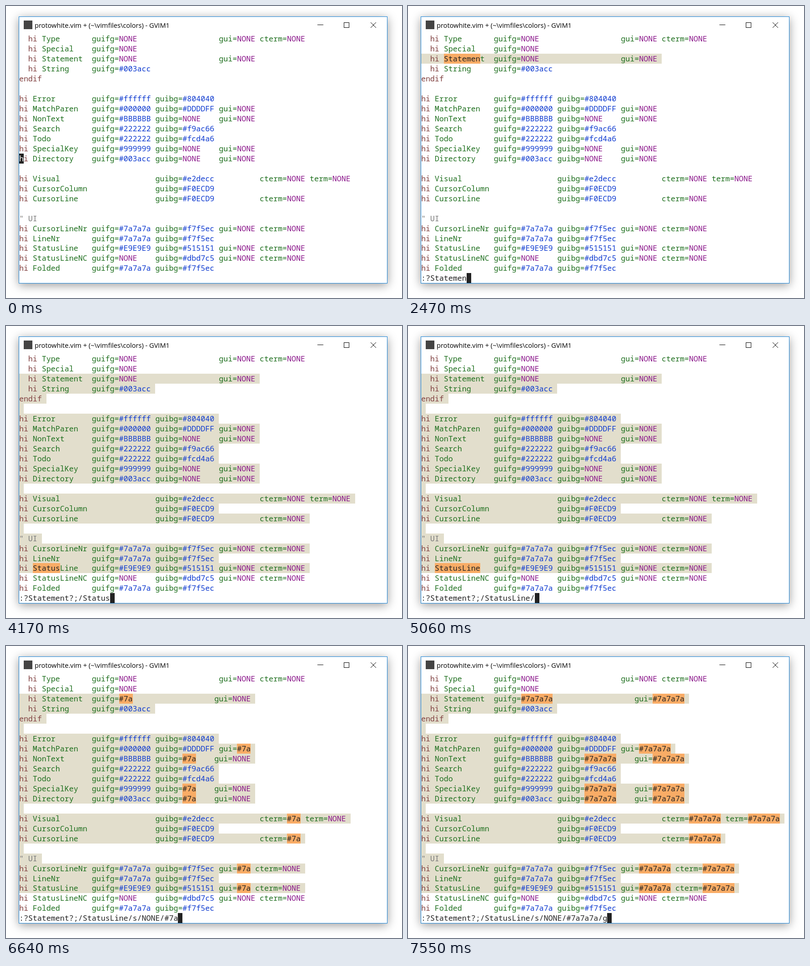
Recreate the animation shown at these times as an HTML page with a canvas. Size 871 by 643 pixels, loop 9330 ms.

```html
<!DOCTYPE html>
<html lang="en">
<head>
<meta charset="utf-8">
<title>Substitute preview</title>
<style>
  html, body { margin: 0; width: 100%; height: 100%; overflow: hidden; background: #fff; }
  canvas { display: block; }
</style>
</head>
<body>
<canvas id="stage" width="871" height="643"></canvas>
<script>
const ctx = document.getElementById('stage').getContext('2d');
const LOOP = 9330, COMMAND_OPENS = 230;
const LEFT = 28.9, TOP = 61.1, CELL = 9.985, ROW = 21.97;
const CURSOR_LINE = 12, COMMAND_ROW = 24;
const COMMAND = ':?Statement?;/StatusLine/s/NONE/#7a7a7a/g';
const COLOR = {
  text: '#222222', keyword: '#804040', group: '#1e6f1e', value: '#8a168a',
  hex: '#0f3bd0', comment: '#7a7a7a', range: '#e2decc', match: '#f9ac66', border: '#1883d7'
};

// Fields are separated by | and padded to fixed columns.
const WIDTHS = [16, 14, 14, 9, 11, 9];
const LINES = `  hi Type|guifg=NONE||gui=NONE|cterm=NONE
  hi Special|guifg=NONE
  hi Statement|guifg=NONE||gui=NONE
  hi String|guifg=#003acc
endif

hi Error|guifg=#ffffff|guibg=#804040
hi MatchParen|guifg=#000000|guibg=#DDDDFF|gui=NONE
hi NonText|guifg=#BBBBBB|guibg=NONE|gui=NONE
hi Search|guifg=#222222|guibg=#f9ac66
hi Todo|guifg=#222222|guibg=#fcd4a6
hi SpecialKey|guifg=#999999|guibg=NONE|gui=NONE
hi Directory|guifg=#003acc|guibg=NONE|gui=NONE

hi Visual||guibg=#e2decc||cterm=NONE|term=NONE
hi CursorColumn||guibg=#F0ECD9
hi CursorLine||guibg=#F0ECD9||cterm=NONE

" UI
hi CursorLineNr|guifg=#7a7a7a|guibg=#f7f5ec|gui=NONE|cterm=NONE
hi LineNr|guifg=#7a7a7a|guibg=#f7f5ec
hi StatusLine|guifg=#E9E9E9|guibg=#515151|gui=NONE|cterm=NONE
hi StatusLineNC|guifg=NONE|guibg=#dbd7c5|gui=NONE|cterm=NONE
hi Folded|guifg=#7a7a7a|guibg=#f7f5ec`.split('\n').map(line =>
  line.split('|').map((field, i) => field.padEnd(WIDTHS[i])).join('').trimEnd());

// [key index, time] pairs; keys between them are evenly spaced.
const RHYTHM = [[0, 1050], [1, 1280], [2, 1450], [14, 3490], [15, 3640], [16, 3830],
  [18, 4170], [19, 4340], [20, 4490], [25, 5390], [26, 5560], [28, 5880], [29, 5990],
  [30, 6190], [32, 6510], [33, 6620], [34, 6770], [39, 7550]];
const SLOW_KEYS = [15, 20, 21, 22, 29, 33, 34, 35, 36, 37];
const KEY_TIMES = Array.from({ length: COMMAND.length - 1 }, (_, key) => {
  const i = Math.max(1, RHYTHM.findIndex(([k]) => k >= key));
  const [k0, t0] = RHYTHM[i - 1], [k1, t1] = RHYTHM[i];
  return t0 + (t1 - t0) * (key - k0) / (k1 - k0);
});
const PREVIEW_TIMES = KEY_TIMES.map((time, key) => time + (SLOW_KEYS.includes(key) ? 20 : 0));

function typedAt(times, t) {
  if (t < COMMAND_OPENS) return '';
  return COMMAND.slice(0, 1 + times.filter(time => time <= t).length);
}

function findMatches(text, pattern) {
  const marks = [];
  for (let at = text.indexOf(pattern); at >= 0; at = text.indexOf(pattern, at + pattern.length))
    marks.push([at, pattern.length]);
  return marks;
}

function substitute(text, pattern, replacement, everywhere) {
  const marks = [];
  let from = 0;
  do {
    const at = text.indexOf(pattern, from);
    if (at < 0) break;
    text = text.slice(0, at) + replacement + text.slice(at + pattern.length);
    marks.push([at, replacement.length]);
    from = at + replacement.length;
  } while (everywhere);
  return { text, marks };
}

function preview(command) {
  const rows = LINES.map(text => ({ text, marks: [], selected: false }));
  const [, back, forward, , pattern, replacement, flag] = command.split(/[?;/]+/);
  if (!back) return rows;
  const first = LINES.slice(0, CURSOR_LINE).findLastIndex(line => line.includes(back));
  const last = forward ? LINES.findIndex((line, i) => i > first && line.includes(forward)) : first;
  for (let i = first; i <= last; i++) {
    const row = rows[i];
    row.selected = true;
    if (replacement) Object.assign(row, substitute(row.text, pattern, replacement, flag === 'g'));
    else if (pattern) row.marks = findMatches(row.text, pattern);
  }
  const searching = !pattern && (forward || !command.endsWith('/'));
  if (searching) rows[last].marks = findMatches(rows[last].text, forward || back).slice(0, 1);
  return rows;
}

function tokenColor(token) {
  if (token[0] === '"') return COLOR.comment;
  if (token[0] === '#') return COLOR.hex;
  if (token === 'NONE') return COLOR.value;
  return token === 'hi' || token === 'endif' ? COLOR.keyword : COLOR.group;
}

const columnX = col => Math.round(LEFT + col * CELL);
const rowY = row => Math.round(TOP + row * ROW);

function fillCells(row, col, count, color) {
  const x = columnX(col), y = rowY(row);
  ctx.fillStyle = color;
  ctx.fillRect(x, y, columnX(col + count) - x, Math.min(rowY(row + 1), 610) - y);
}

function drawText(row, col, text, color) {
  ctx.fillStyle = color;
  [...text].forEach((char, i) => ctx.fillText(char, LEFT + (col + i) * CELL, rowY(row) + 17));
}

function drawRow({ text, marks, selected }, row) {
  if (selected) fillCells(row, 0, text.length + 1, COLOR.range);
  const colors = [];
  for (const match of text.matchAll(/".*|#\w*|NONE|\w+=?/g))
    colors.fill(0, 0, 0), [...match[0]].forEach((_, i) => { colors[match.index + i] = tokenColor(match[0]); });
  for (const [start, length] of marks) {
    fillCells(row, start, length, COLOR.match);
    for (let i = start; i < start + length; i++) colors[i] = COLOR.text;
  }
  [...text].forEach((char, i) => { if (char !== ' ') drawText(row, i, char, colors[i]); });
}

function drawCursor(row, col, char = '') {
  fillCells(row, col, 1, COLOR.text);
  drawText(row, col, char, '#fff');
}

function strokeLines(...lines) {
  ctx.beginPath();
  for (const [x0, y0, x1, y1] of lines) {
    ctx.moveTo(x0, y0);
    ctx.lineTo(x1, y1);
  }
  ctx.stroke();
}

function drawWindow() {
  ctx.fillStyle = '#fff';
  ctx.fillRect(0, 0, 871, 643);
  ctx.save();
  ctx.shadowColor = 'rgba(0, 0, 0, 0.4)';
  ctx.shadowBlur = 20;
  ctx.shadowOffsetY = 4;
  ctx.fillRect(28, 23, 811, 588);
  ctx.restore();
  ctx.lineWidth = 1;
  ctx.strokeStyle = COLOR.border;
  ctx.strokeRect(28.5, 23.5, 810, 587);

  ctx.fillStyle = '#444';
  ctx.fillRect(39, 32, 19, 19);
  ctx.fillStyle = '#000';
  ctx.font = '14.6px "Open Sans", sans-serif';
  ctx.fillText('protowhite.vim + (~\\vimfiles\\colors) - GVIM1', 63, 48);

  ctx.strokeStyle = '#000';
  strokeLines([685, 41.5, 698, 41.5], [802, 36, 814, 48], [814, 36, 802, 48]);
  ctx.strokeRect(743.5, 36.5, 11, 11);
}

function draw(t) {
  drawWindow();
  ctx.font = '16.64px "Noto Sans Mono", monospace';
  preview(typedAt(PREVIEW_TIMES, t)).forEach(drawRow);
  const command = typedAt(KEY_TIMES, t);
  if (command) {
    drawText(COMMAND_ROW, 0, command, COLOR.text);
    drawCursor(COMMAND_ROW, command.length);
  } else {
    drawCursor(CURSOR_LINE, 0, 'h');
  }
}

function tick() {
  draw(performance.now() % LOOP);
  requestAnimationFrame(tick);
}
tick();
</script>
</body>
</html>
```
